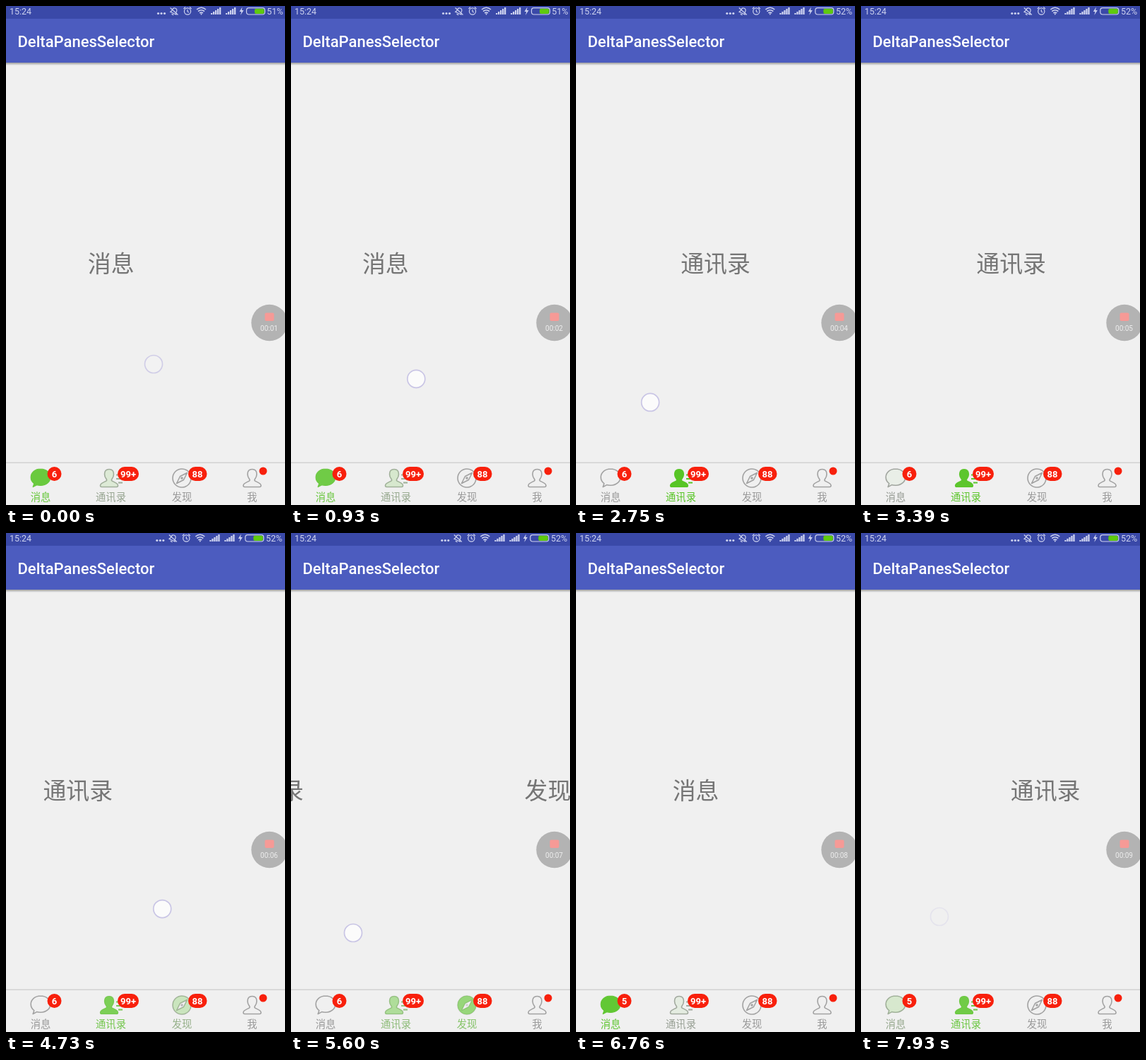
Animation of 395x705 px, one loop 7.99 s. Source, as an HTML page:

```html
<!DOCTYPE html>
<html lang="zh-CN">
<head>
<meta charset="utf-8">
<style>
  html, body { margin: 0; width: 100%; height: 100%; overflow: hidden; background: #f0f0f0; }
  svg { display: block; }
  text { font-family: Roboto, "Noto Sans CJK SC", "Noto Sans CJK", sans-serif; }
  .cjk { font-family: "Noto Sans CJK SC", "Noto Sans CJK", sans-serif; text-anchor: middle; }
  .page { font-size: 32.9px; fill: #757575; }
  .label { font-size: 14.3px; }
  .badge { font-size: 13px; font-weight: 700; fill: #fff; text-anchor: middle; }
  .normal { fill: none; stroke: #a2a2a2; stroke-width: 1.6; stroke-linejoin: round; }
  .normal text { fill: #999; stroke: none; }
  .selected { fill: #58c526; stroke: #58c526; stroke-width: 1.2; stroke-linejoin: round; }
  .selected text { stroke: none; }
</style>
</head>
<body>
<svg width="395" height="705" viewBox="0 0 395 705">
  <defs>
    <linearGradient id="shade" x2="0" y2="1">
      <stop stop-color="#000" stop-opacity=".35"/>
      <stop offset="1" stop-color="#000" stop-opacity="0"/>
    </linearGradient>
    <path id="person" d="M0 654.5c-4.5 0-6.5 3-6.5 7c0 4 2 6 3 7.5v1.5c-2 2-9 3-9 7q0 2 2 2h21q2 0 2-2c0-4-7-5-9-7v-1.5c1-1.5 3-3.5 3-7.5c0-4-2-7-6.5-7z"/>
    <path id="bars" d="M0 0h2.300v-2h-2.300zM3 0h2.300v-4h-2.300zM6 0h2.300v-6h-2.300zM9 0h2.300v-8h-2.300zM12 0h2.300v-10h-2.300z"/>
  </defs>
  <rect width="395" height="705" fill="#f0f0f0"/>

  <rect width="395" height="18" fill="#3a49a8"/>
  <rect y="18" width="395" height="62" fill="#4c5cbf"/>
  <rect y="80" width="395" height="4" fill="url(#shade)"/>
  <text x="16.500" y="58" font-size="22" font-weight="500" fill="#fff">DeltaPanesSelector</text>

  <g fill="#cdd2ef" font-size="12.500">
    <text x="5" y="12">15:24</text>
    <g id="status">
      <circle cx="215.500" cy="10.500" r="1.600"/><circle cx="220" cy="10.500" r="1.600"/><circle cx="224.500" cy="10.500" r="1.600"/>
      <g fill="none" stroke="#cdd2ef" stroke-width="1.200">
        <path d="M233.500 10.500h9l-1.300-2.500v-2a3.200 3.200 0 0 0-6.400 0v2zM236.500 12.500h3" transform="rotate(25 238 7.500)"/>
        <path d="M232.500 2.500l11 10"/>
        <circle cx="257" cy="7.500" r="4.600"/><path d="M257 5v3l2 1M251.500 4l2.500-2.500M262.500 4l-2.500-2.500"/>
        <path d="M270 5q6.500-5.500 13 0M272 7.500q4.500-3.500 9 0M274 10q2.500-2 5 0" stroke-width="1.600"/>
        <rect x="340.500" y="2.700" width="26" height="9.300" rx="3.500"/>
      </g>
      <path d="M275 10.500h3l-1.500 2.500z"/>
      <use href="#bars" x="290" y="12"/><use href="#bars" x="311" y="12"/>
      <path d="M334.500 1.500l-4 6.500h2.700l-1.200 5 4.500-7h-2.700z"/>
      <rect x="352" y="3.700" width="13.500" height="7.300" rx="2" fill="#5fca0e"/>
    </g>
    <text id="battery" y="12"></text>
  </g>

  <g id="pages"></g>

  <g>
    <rect y="644.500" width="395" height="1.500" fill="#d2d2d2"/>
    <g id="tabs"></g>
    <g fill="#f8200c">
      <circle cx="68.500" cy="661" r="10"/>
      <rect x="158" y="651" width="30" height="20" rx="10"/>
      <rect x="258" y="651" width="26.500" height="20" rx="10"/>
      <circle cx="364" cy="657" r="5.500"/>
    </g>
    <text id="unread" class="badge" x="68.500" y="665.500"></text>
    <text class="badge" x="173" y="665.500">99+</text>
    <text class="badge" x="271" y="665.500">88</text>
  </g>

  <circle cx="373" cy="447.500" r="25.700" fill="#b3b3b3"/>
  <rect x="366.500" y="433.500" width="13" height="11.500" rx="2" fill="#f69a96"/>
  <text id="clock" x="372.500" y="459" font-size="10" fill="#eee" text-anchor="middle"></text>

  <circle id="touch" r="12.500" fill="#fff" stroke="#c9c5e5" stroke-width="1.700"/>
</svg>
<script>
const LOOP = 7990, WIDTH = 395, FADE = 200;
const $ = id => document.getElementById(id);

const bubble = 'M49 654c-7.800 0-13.800 5-13.800 11.700c0 4 2 7 4.600 9l-1.600 4.800l5.300-2.900c1.700.5 3.500.7 5.500.7c7.800 0 13.800-5 13.800-11.600s-6-11.700-13.800-11.700z';
const dial = 'M236 667a13 13 0 1 0 26 0a13 13 0 1 0-26 0z';
const needle = 'M256.500 659.500l-5 10-10 5 5-10z';
const lines = '<path d="M156 662.500h9M156 668h9M159 673.500h6" stroke-width="1.800"/>';
const tabs = [
  { name: '消息', x: 49, icon: `<path d="${bubble}"/>` },
  { name: '通讯录', x: 148.5, icon: `<use href="#person" x="146"/>${lines}` },
  { name: '发现', x: 249,
    icon: `<path d="${dial}${needle}"/><circle cx="249" cy="667" r="1"/>`,
    active: `<path d="${dial}${needle}" fill-rule="evenodd" stroke-width=".8"/>` },
  { name: '我', x: 348.5, icon: '<use href="#person" x="348.500"/>' },
];

$('pages').innerHTML = tabs.map((tab, i) =>
  `<text class="cjk page" x="${WIDTH * (i + .5)}" y="376">${tab.name}</text>`).join('');
$('tabs').innerHTML = tabs.map(tab => {
  const label = `<text class="cjk label" x="${tab.x}" y="699">${tab.name}</text>`;
  return `<g class="normal">${tab.icon}${label}</g><g class="selected">${tab.active || tab.icon}${label}</g>`;
}).join('');
const layers = [...$('tabs').children];

// Swipes: path points [ms, x, y]; the second point is where the page starts to follow.
const swipes = [
  { from: 0, to: 0, end: 400, path: [[-560, 302, 482], [-520, 288.5, 484], [-40, 209, 506]] },
  { from: 0, to: 1, end: 2400, path: [[430, 255, 505], [560, 241, 508], [1800, 28, 571], [1850, 22, 573]] },
  { from: 1, to: 1, end: 3720, path: [[2750, 105, 560], [2840, 119, 556], [3170, 317, 520]] },
  { from: 1, to: 0, end: 7217, path: [[4160, 329, 505], [4400, 317, 508], [4730, 221.5, 531], [4910, 176, 542],
    [5600, 88, 565], [5680, 86, 566], [6468, 378, 520]] },
  { from: 0, to: 1, end: 8390, path: [[7290, 277, 498], [7360, 263, 501], [7790, 111, 542]] },
];

function pointAt(path, t) {
  let i = 1;
  while (i < path.length - 1 && t > path[i][0]) i++;
  const [t0, x0, y0] = path[i - 1], [t1, x1, y1] = path[i];
  const k = Math.min(1, Math.max(0, (t - t0) / (t1 - t0)));
  return [x0 + (x1 - x0) * k, y0 + (y1 - y0) * k];
}

function pagerAt({ from, to, end, path }, t) {
  const release = path.at(-1)[0];
  const [start, anchor] = path[1];
  const dragged = t < start ? from : from + (anchor - pointAt(path, t)[0]) / WIDTH;
  if (t <= release) return dragged;
  const left = Math.max(0, (end - t) / (end - release));
  return to + (dragged - to) * left ** 5;
}

function draw(t) {
  const swipe = swipes.findLast(s => t >= s.path[0][0]);
  const position = pagerAt(swipe, t);
  $('pages').setAttribute('transform', `translate(${-position * WIDTH})`);
  tabs.forEach((_, i) => {
    const active = Math.max(0, 1 - Math.abs(position - i));
    layers[2 * i].setAttribute('opacity', 1 - active);
    layers[2 * i + 1].setAttribute('opacity', active);
  });

  const [x, y] = pointAt(swipe.path, t);
  const shown = 1 - Math.min(1, Math.max(0, (t - swipe.path.at(-1)[0]) / FADE));
  const touch = $('touch');
  touch.setAttribute('cx', x);
  touch.setAttribute('cy', y);
  touch.setAttribute('opacity', shown);
  touch.setAttribute('fill-opacity', .75 * shown ** 6);

  const charged = t >= 2000;
  $('battery').textContent = charged ? '52%' : '51%';
  $('battery').setAttribute('x', charged ? 368 : 369.3);
  $('status').setAttribute('transform', `translate(${charged ? -1.7 : 0})`);
  $('unread').textContent = t < 6468 ? 6 : 5;
  $('clock').textContent = '00:0' + (Math.floor((t - 330) / 1000) + 2);
}

function tick() {
  draw(performance.now() % LOOP);
  requestAnimationFrame(tick);
}
tick();
</script>
</body>
</html>
```
